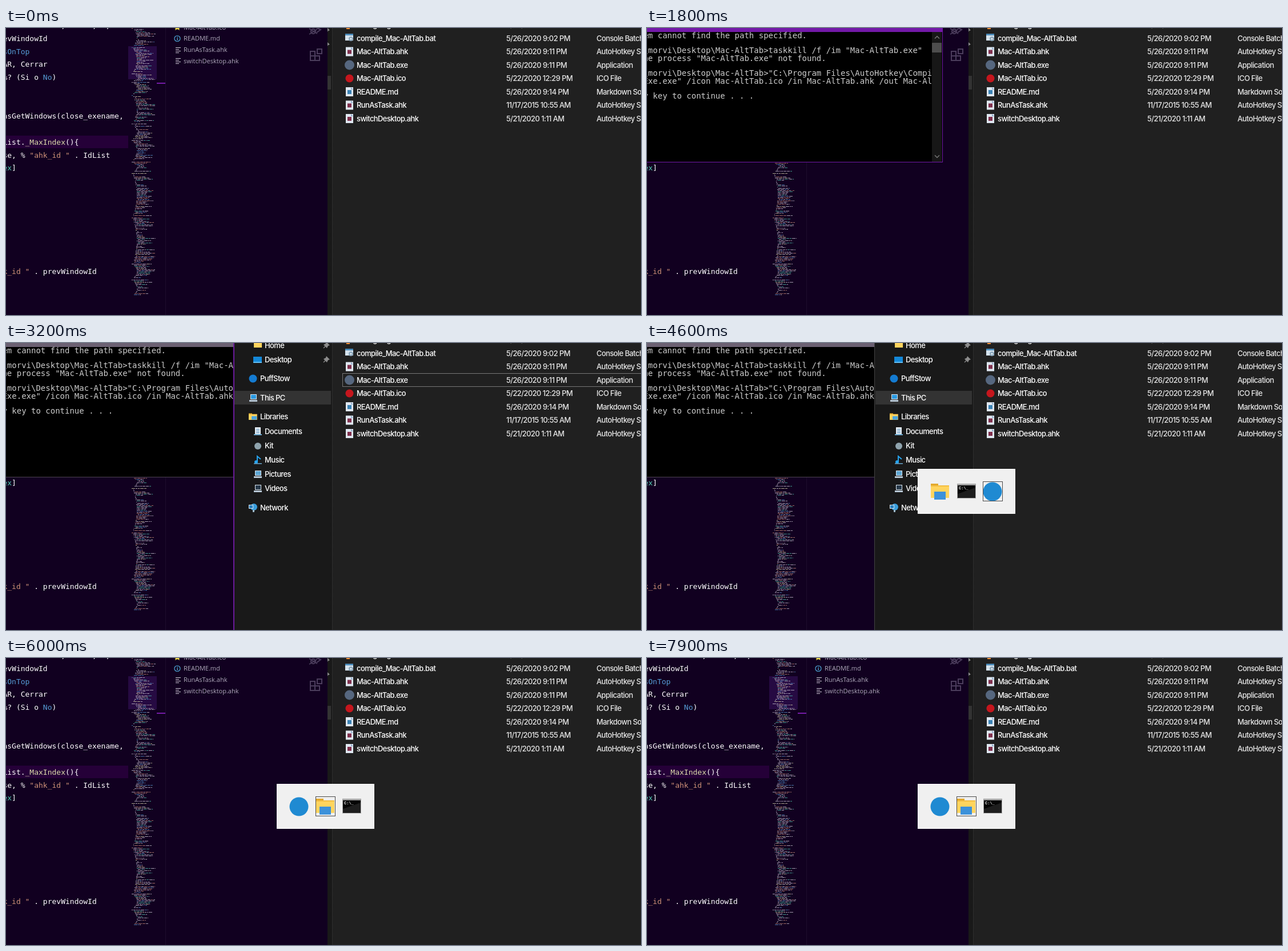
An HTML page with a canvas that plays this animation: 1112x504 px, repeating every 8 s.

```html
<!DOCTYPE html>
<html lang="en">
<head>
<meta charset="utf-8">
<title>Window switcher</title>
<style>
  html, body { margin: 0; width: 100%; height: 100%; overflow: hidden; background: #110020; }
  canvas { display: block; width: 1112px; height: 504px; }
</style>
</head>
<body>
<canvas id="stage" width="1112" height="504"></canvas>
<script>
const ctx = document.getElementById('stage').getContext('2d');
const LOOP = 8000;

const CODE = '13px "DejaVu Sans Mono", monospace';
const CONSOLE = '14px "DejaVu Sans Mono", monospace';
const SIDE = '11px "Open Sans", sans-serif';
const UI = '500 13px Inter, sans-serif';

// Windows: e = explorer, v = editor, c = console; most recent first.
// Without "selected" the switcher is closed.
const TIMELINE = [
  { at: 0, order: 'vce' },
  { at: 1000, order: 'vce', selected: 1 },
  { at: 1800, order: 'cve', focus: true },
  { at: 2300, order: 'cve', focus: true, caret: true },
  { at: 2500, order: 'cve', selected: 1 },
  { at: 2900, order: 'cve', selected: 2 },
  { at: 3200, order: 'ecv', focus: true },
  { at: 4200, order: 'ecv', selected: 1 },
  { at: 4600, order: 'ecv', selected: 2 },
  { at: 5200, order: 'vec', focus: true, caret: true },
  { at: 5600, order: 'vec', focus: true },
  { at: 6000, order: 'vec', selected: 1 },
  { at: 6500, order: 'evc' },
  { at: 6600, order: 'evc', focus: true },
  { at: 7000, order: 'evc', focus: true, selected: 1 },
  { at: 7100, order: 'evc', selected: 1 },
  { at: 7200, order: 'vec', focus: true, caret: true },
  { at: 7600, order: 'vec', focus: true },
  { at: 7900, order: 'vec', selected: 1 }
];

function rect(x, y, w, h, color) {
  ctx.fillStyle = color;
  ctx.fillRect(x, y, w, h);
}

function frame(x, y, w, h, color) {
  ctx.strokeStyle = color;
  ctx.lineWidth = 1;
  ctx.strokeRect(x + .5, y + .5, w - 1, h - 1);
}

function disc(x, y, r, color) {
  ctx.fillStyle = color;
  ctx.beginPath();
  ctx.arc(x, y, r, 0, 7);
  ctx.fill();
}

function ring(x, y, r, width, color) {
  ctx.strokeStyle = color;
  ctx.lineWidth = width;
  ctx.beginPath();
  ctx.arc(x, y, r, 0, 7);
  ctx.stroke();
}

function poly(color, ...xy) {
  ctx.fillStyle = color;
  ctx.beginPath();
  for (let i = 0; i < xy.length; i += 2) ctx.lineTo(xy[i], xy[i + 1]);
  ctx.fill();
}

function line(color, width, ...xy) {
  ctx.strokeStyle = color;
  ctx.lineWidth = width;
  ctx.beginPath();
  for (let i = 0; i < xy.length; i += 2) ctx.lineTo(xy[i], xy[i + 1]);
  ctx.stroke();
}

function text(str, x, baseline, font, color, spacing = 0) {
  ctx.font = font;
  ctx.letterSpacing = spacing + 'px';
  ctx.fillStyle = color;
  ctx.fillText(str, x, baseline);
}

const label = (str, x, middle, color = '#fff') =>
  text(str, x, Math.round(middle + 4.5), UI, color, -.6);

function clipped(x, y, w, h, draw) {
  ctx.save();
  ctx.beginPath();
  ctx.rect(x, y, w, h);
  ctx.clip();
  draw();
  ctx.restore();
}

function randomizer(seed) {
  return () => (seed = (seed * 16807) % 2147483647) / 2147483647;
}

// --- Editor ---

const WHITE = '#fff', BLUE = '#569cd6', ORANGE = '#ce9178', YELLOW = '#dcdcaa', TEAL = '#4ec9b0';
const CODE_LINES = [
  [0, ['             ,      ,  ,', WHITE]],
  [1, ['evWindowId', WHITE]],
  [2, ['sOnTop', BLUE]],
  [3, ['AR, Cerrar', WHITE]],
  [4, ['%? (Si o ', WHITE], ['No', BLUE], [')', WHITE]],
  [7, ['nsGetWindows(close_exename,', WHITE]],
  [9, ['List.', WHITE], ['_MaxIndex', YELLOW], ['(){', WHITE]],
  [10, ['se, % ', WHITE], ['"ahk_id "', ORANGE], [' . IdList', WHITE]],
  [11, ['ex', TEAL], [']', WHITE]],
  [19, ['k_id "', ORANGE], [' . prevWindowId', WHITE]]
];

function minimap() {
  const sections = [0, 34, 80, 95, 118, 168, 197, 235, 255, 333, 414, 442, 472];
  const accents = [ORANGE, BLUE, TEAL, YELLOW];
  const random = randomizer(77);
  ctx.globalAlpha = .72;
  sections.slice(0, -1).forEach((top, i) => {
    const bottom = sections[i + 1] - 2;
    for (let y = top; y < bottom; y += 2) {
      const depth = (y - top) / (bottom - top);
      const indent = y === top ? 0 : Math.round(2 + 7 * Math.sin(depth * 3.1)) + (random() < .3 ? 2 : 0);
      const accent = accents[Math.floor(random() * accents.length)];
      const width = random() < .18 ? 2 : 10 + Math.floor(random() * 26);
      const end = Math.min(262, 220 + indent + width);
      for (let x = 220 + indent; x < end;) {
        const w = Math.min(end - x, 1 + Math.floor(random() * 6));
        rect(x, y, w, 1, random() < .4 ? accent : '#d6d2de');
        x += w + 1;
      }
    }
  });
  ctx.globalAlpha = 1;
}

function listIcon(y) {
  [9, 6, 9, 6].forEach((w, i) => rect(297, y - 5 + i * 3, w, 1, '#d0ccd8'));
}

function activityIcons() {
  const dim = '#4b3d5c';
  ring(538, 6, 4, 2, dim);
  line(dim, 1.5, 531, 1, 545, 10);
  line(dim, 1.5, 531, 11, 545, 2);
  line(dim, 2, 541, -2, 551, 3, 544, 8);
  ctx.lineWidth = 2;
  ctx.strokeRect(533, 41, 8, 8);
  ctx.strokeRect(533, 49, 8, 8);
  ctx.strokeRect(541, 49, 8, 8);
  ctx.strokeRect(545, 37, 8, 8);
}

function editor(caret) {
  clipped(0, 0, 563, 504, () => {
    rect(0, 0, 563, 504, '#110020');
    rect(0, 189, 214, 22, '#250038');
    for (const [row, ...parts] of CODE_LINES) {
      let x = -5.6;
      for (const [str, color] of parts) {
        text(str, x, Math.round(row * 22.75), CODE, color);
        x += ctx.measureText(str).width;
      }
    }
    if (caret) rect(26.5, 189, 2, 22, '#d8d4df');
    rect(214, 32, 50, 58, '#260a42');
    minimap();
    rect(264, 96, 15, 2, '#761ca8');
    rect(279, 0, 1, 504, '#1d0d2c');

    const gray = '#aea8ba', info = '#4fa8d8';
    poly('#e8d44d', 300, -6, 302, -2, 306, -1, 303, 1, 304, 4, 300, 2, 296, 4, 297, 1, 294, -1, 298, -2);
    text('Mac-AltTab.ico', 311, 3, SIDE, gray);
    ring(300, 18.5, 5, 1.2, info);
    rect(299.4, 17.5, 1.4, 4, info);
    rect(299.4, 15, 1.4, 1.4, info);
    text('README.md', 311, 22, SIDE, gray);
    listIcon(39);
    text('RunAsTask.ahk', 311, 42, SIDE, gray);
    listIcon(58);
    text('switchDesktop.ahk', 311, 62, SIDE, gray);
    activityIcons();
  });
}

// --- Console ---

const CONSOLE_LINES = [
  [0, 'The system cannot find the path specified.'],
  [2, 'C:\\Users\\morvi\\Desktop\\Mac-AltTab>taskkill /f /im "Mac-AltTab.exe"'],
  [3, 'ERROR: The process "Mac-AltTab.exe" not found.'],
  [5, 'C:\\Users\\morvi\\Desktop\\Mac-AltTab>"C:\\Program Files\\AutoHotkey\\Compi'],
  [6, 'ler\\Ahk2Exe.exe" /icon Mac-AltTab.ico /in Mac-AltTab.ahk /out Mac-Al'],
  [8, 'Press any key to continue . . .']
];

function consoleWindow(focus, caret) {
  const edge = focus ? '#7319a8' : '#6b6072';
  rect(0, 0, 518, 236, focus ? '#7319a8' : '#4c4452');
  rect(0, 0, 517, 7, edge);
  rect(0, 7, 517, 228, '#000');
  clipped(0, 7, 498, 228, () => {
    for (const [row, str] of CONSOLE_LINES)
      text(str, -74, Math.round(17.5 + row * 13.35), CONSOLE, '#ccc');
  });
  if (caret) rect(196, 124, 9, 4, '#ccc');
  rect(499, 7, 17, 228, '#171717');
  rect(499, 26, 17, 17, '#4d4d4d');
  line('#777', 1.5, 504, 18.5, 508, 14.5, 512, 18.5);
  line('#777', 1.5, 504, 223.5, 508, 227.5, 512, 223.5);
}

// --- Explorer ---

function page(x, y, mark) {
  rect(x, y - 8, 13, 16, '#dfe7f1');
  poly('#91aecd', x + 9, y - 8, x + 13, y - 4, x + 9, y - 4);
  rect(x + 3, y - 3, 7, 7, mark);
}

function folder(x, y, s, tray) {
  rect(x, y, 13 * s, 10 * s, '#e3a92c');
  rect(x, y + 3 * s, 32 * s, 22 * s, '#ffd45e');
  rect(x, y + 3 * s, 32 * s, 2 * s, '#f2bd42');
  if (tray) rect(x + 6 * s, y + 14 * s, 20 * s, 14 * s, '#3c91da');
}

function monitor(x, y, screen) {
  rect(x - 7, y + 4, 14, 3, '#b8c8d6');
  rect(x - 5, y - 6, 11, 9, '#dbe8f2');
  rect(x - 4, y - 5, 9, 7, screen);
}

const scriptIcon = y => page(595, y, '#80304d');
const FILES = [
  [-5.5, 'changelog.txt', '5/26/2020 9:14 PM', 'Text Document', () => rect(596, -8, 6, 10, '#ef8b32')],
  [18, 'compile_Mac-AltTab.bat', '5/26/2020 9:02 PM', 'Console Batch File', y => {
    rect(594, y - 8, 14, 12, '#d5e3ee');
    rect(594, y - 8, 14, 3, '#4d8dbc');
    disc(604, y + 1, 4, '#8da8bd');
    disc(604, y + 1, 1.5, '#e9f2f8');
  }],
  [41.5, 'Mac-AltTab.ahk', '5/26/2020 9:11 PM', 'AutoHotkey Script', scriptIcon],
  [65, 'Mac-AltTab.exe', '5/26/2020 9:11 PM', 'Application', y => disc(601.5, y, 8.5, '#56677f')],
  [88.5, 'Mac-AltTab.ico', '5/22/2020 12:29 PM', 'ICO File', y => disc(601.5, y, 7, '#c5161d')],
  [112, 'README.md', '5/26/2020 9:14 PM', 'Markdown Source File', y => page(595, y, '#3a82b5')],
  [135.5, 'RunAsTask.ahk', '11/17/2015 10:55 AM', 'AutoHotkey Script', scriptIcon],
  [159, 'switchDesktop.ahk', '5/21/2020 1:11 AM', 'AutoHotkey Script', scriptIcon]
];

const NAV = [
  [4, 453, 'Home', () => folder(434, -3, .44)],
  [29, 453, 'Desktop', y => { rect(433, y - 5, 15, 11, '#1488d8'); rect(433, y + 4, 15, 2, '#63bff5'); }],
  [62.5, 445, 'PuffStow', y => disc(432.5, y, 7, '#147bd1')],
  [96, 445, 'This PC', y => monitor(433, y, '#2b9be2')],
  [129.5, 445, 'Libraries', y => { folder(425, y - 6, .46); rect(430, y - 1, 9, 6, '#49a5df'); }],
  [155, 453, 'Documents', y => {
    rect(436, y - 7, 10, 12, '#e7eef5');
    for (let i = 0; i < 3; i++) rect(438, y - 4 + i * 3, 6, 1, '#4383b5');
    rect(434, y + 5, 14, 2, '#6aa8cf');
  }],
  [180, 453, 'Kit', y => disc(441, y + 1, 6, '#8fa3ad')],
  [205, 453, 'Music', y => {
    line('#26a3ee', 2, 440, y + 4, 440, y - 6, 446, y - 1);
    disc(438, y + 4, 3, '#26a3ee');
    rect(434, y + 6, 14, 1.5, '#6aa8cf');
  }],
  [230, 453, 'Pictures', y => monitor(441, y, '#5da6d3')],
  [255, 453, 'Videos', y => monitor(441, y, '#263849')],
  [289, 445, 'Network', y => {
    disc(434, y - 1, 6, '#3a9edb');
    rect(425, y - 5, 8, 7, '#d6e6f2');
    rect(426, y - 4, 6, 5, '#297fbd');
    rect(432, y + 4, 3, 4, '#9db8c9');
  }]
];

function pin(y) {
  poly('#8d8d8d', 561, y - 6, 567, y, 564, y + 1, 562, y + 5, 556, y - 1, 560, y - 3);
  line('#8d8d8d', 1.2, 559, y + 2, 556, y + 5);
}

function explorer(focus) {
  rect(398, 0, 714, 504, '#202020');
  rect(398, 0, 173, 504, '#191919');
  rect(400, 84, 169, 24, '#333');
  ctx.setLineDash([1, 1]);
  line('#3c3c3c', 1, 571.5, 0, 571.5, 504);
  ctx.setLineDash([]);
  for (const [y, x, name, icon] of NAV) {
    icon(y);
    label(name, x, y);
  }
  pin(4);
  pin(29);
  for (const [y, name, date, kind, icon] of FILES) {
    icon(y);
    label(name, 614, y);
    label(date, 876, y, '#e6e6e6');
    label(kind, 1034, y, '#e6e6e6');
  }
  if (focus) frame(589, 53, 530, 24, '#777');
  rect(398, 0, focus ? 2 : 1, 504, focus ? '#6a1b9a' : '#424242');
}

// --- Switcher ---

const APP_ICONS = {
  v: x => disc(x, 261, 16.5, '#1f8ad2'),
  e: x => folder(x - 16, 247, 1, true),
  c: x => {
    rect(x - 16, 247, 33, 26, '#a7a7a7');
    rect(x - 15, 250, 31, 22, '#050505');
    poly('#1e1e1e', x - 15, 265, x + 16, 254, x + 16, 272, x - 15, 272);
    text('C:\\_', x - 13, 257, 'bold 7px "Liberation Mono", monospace', '#eee');
  }
};

function switcher(order, selected) {
  rect(474, 221, 171, 79, '#f0f0f0');
  frame(474, 221, 171, 79, '#fff');
  [...order].forEach((app, i) => APP_ICONS[app](513 + i * 46));
  frame(496 + selected * 46, 243, 35, 35, '#4a4a4a');
}

function render({ order, focus, caret, selected }) {
  for (const app of [...order].reverse()) {
    const front = app === order[0];
    if (app === 'e') explorer(front && focus);
    if (app === 'v') editor(front && caret);
    if (app === 'c') consoleWindow(front && focus, front && caret);
  }
  if (selected) switcher(order, selected);
}

const start = performance.now();
let shown;

function tick() {
  const time = (performance.now() - start) % LOOP;
  const state = TIMELINE.findLast(step => step.at <= time);
  if (state !== shown) render(shown = state);
  requestAnimationFrame(tick);
}
tick();
</script>
</body>
</html>
```
